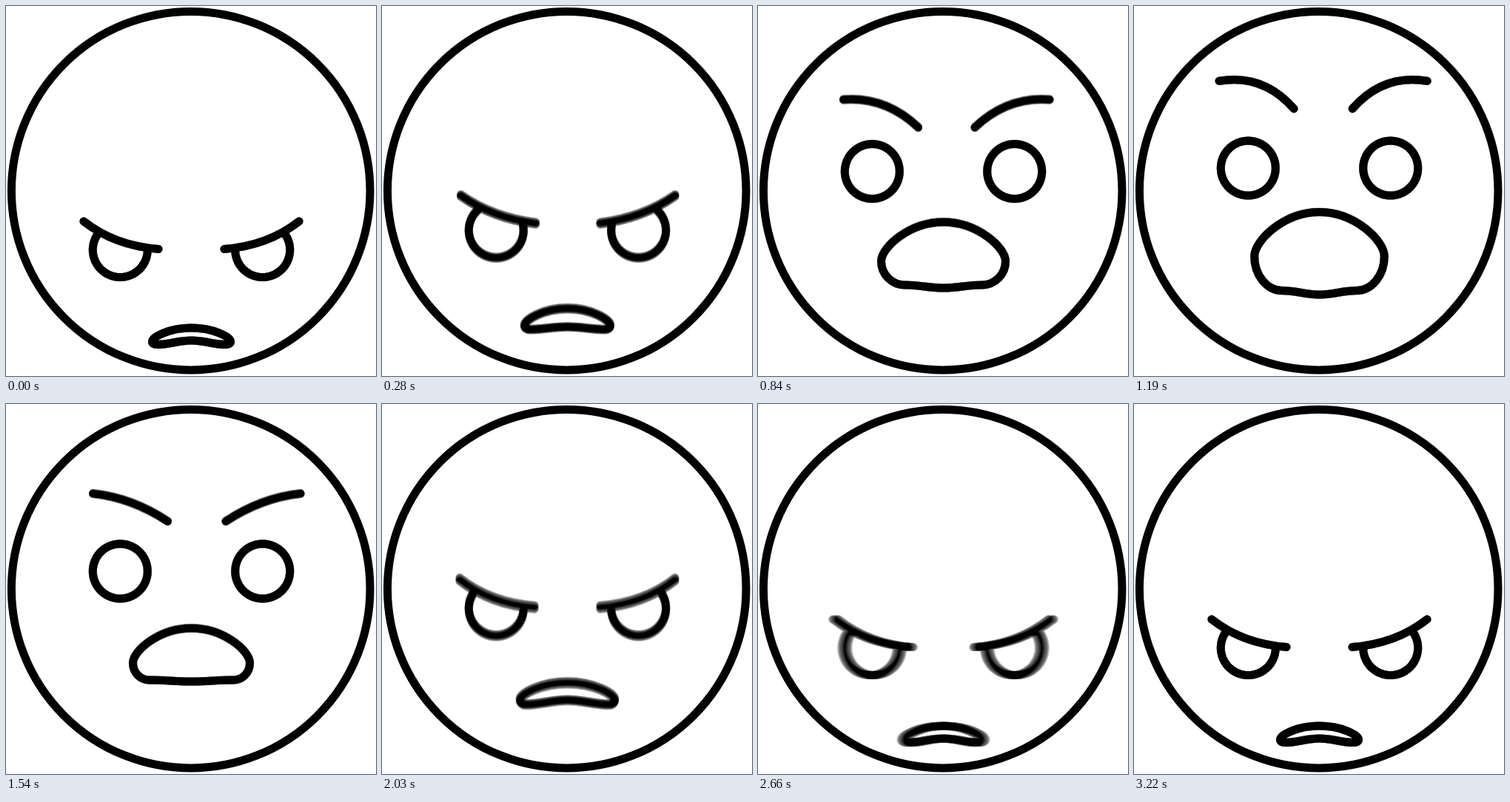
Animation, 500 px wide and 500 px high, one loop 3.29 s. Source, as an HTML page with a canvas:

```html
<!DOCTYPE html>
<html lang="en">
<head>
<meta charset="utf-8">
<title>Grumpy face</title>
<style>
  html, body { margin: 0; width: 100%; height: 100%; overflow: hidden; background: #fff; }
  svg, canvas { position: absolute; left: 0; top: 0; width: 500px; height: 500px; }
  canvas { filter: url(#firm); }
</style>
</head>
<body>
<svg viewBox="0 0 500 500">
  <filter id="firm" color-interpolation-filters="sRGB">
    <feComponentTransfer><feFuncA type="table" tableValues="0 .3 .55 .65 .75 .87 1"/></feComponentTransfer>
  </filter>
  <circle cx="249.7" cy="249.7" r="242.3" fill="none" stroke="#000" stroke-width="11"/>
</svg>
<canvas width="500" height="500"></canvas>
<script>
const LOOP = 3290, STEP = 70, SHUTTER = 22, SAMPLES = 8;
const MIRROR = 501, MID = 250.5;

// brow y, brow sag, left dx, right dx (mirrored), eye y,
// mouth: top, bottom, half width, side y, corner offset, corner y
const REST = [291, 14, 0, 0, 329.5, 435, 452, 53, 453.5, 47, 457.5];
const POSES = [
  [0, REST],
  [420, [226, 8, 3, 0, 281, 383, 417, 63, 411, 54, 419]],
  [560, [172, -3, 6, 1, 243.5, 325, 385.5, 75, 364, 58, 384.5]],
  [630, [152, -9, 8, 1.5, 234, 311, 384, 79, 355, 57, 382]],
  [840, [126.5, -23, 10.5, 2, 223.5, 292, 381, 84, 345, 52, 377]],
  [1150, [101, -29, 10, 0, 219, 278, 390.5, 88, 338, 50, 385]],
  [1540, [121, -13, 12.5, -2, 226, 303, 375, 79, 350, 57, 373]],
  [1680, [138, -6, 12, -5, 232, 312, 377, 77, 354, 58, 376]],
  [2030, [237, 14, 0, 0, 276, 376.5, 400, 64, 400, 57, 406]],
  [2180, REST]
];

// Slope at a pose: flat at the ends and at turning points.
function slope(i, k) {
  if (i === 0 || i === POSES.length - 1) return 0;
  const [[ta, a], [, b], [tc, c]] = POSES.slice(i - 1, i + 2);
  return (b[k] - a[k]) * (c[k] - b[k]) <= 0 ? 0 : (c[k] - a[k]) / (tc - ta);
}

function poseAt(t) {
  if (t <= 0 || t >= 2180) return REST;
  const i = POSES.findIndex(p => p[0] > t) - 1;
  const [t0, a] = POSES[i], [t1, b] = POSES[i + 1];
  const d = t1 - t0, u = (t - t0) / d, v = 1 - u;
  return a.map((from, k) =>
    from * (1 + 2 * u) * v * v + b[k] * (3 - 2 * u) * u * u +
    d * u * v * (slope(i, k) * v - slope(i + 1, k) * u));
}

function shakeAt(t) {
  const half = 88.2, n = (t - 2219) / half;
  if (n < 0 || n > 8) return 0;
  return (n > 7 ? 4.5 : 14) * Math.sin(n * Math.PI);
}

// Vertical opening of the eyes.
function lidAt(t) {
  if (t < 470 || t > 580) return 1;
  return t < 537 ? 1 - .85 * (t - 470) / 67 : .15 + .85 * (t - 537) / 43;
}

function addSide(path, flip, shift, browY, sag, dx, eyeY, lid) {
  const X = x => (flip ? MIRROR - x : x) + shift;
  const x0 = 105 + dx, x2 = 206 + dx, y2 = browY + 37.5;
  const xc = (x0 + x2) / 2 - 3 - .42 * sag, yc = (browY + y2) / 2 + sag;
  const curve = (a, b, c, u) => a * (1 - u) ** 2 + 2 * b * u * (1 - u) + c * u * u;
  path.moveTo(X(x0), browY);
  path.quadraticCurveTo(X(xc), yc, X(x2), y2);

  const browAt = x => {
    let lo = 0, hi = 1;
    for (let i = 0; i < 12; i++) {
      const m = (lo + hi) / 2;
      if (curve(x0, xc, x2, m) < x) lo = m; else hi = m;
    }
    return curve(browY, yc, y2, lo);
  };

  // Only the part of the eye under the brow is drawn.
  let drawing = false;
  for (let i = 0; i <= 96; i++) {
    const a = (i / 48 - .5) * Math.PI;
    const x = 154.3 + 37 * Math.cos(a), y = eyeY + 37 * lid * Math.sin(a);
    const seen = y >= browAt(x);
    if (seen) path[drawing ? 'lineTo' : 'moveTo'](X(x), y);
    drawing = seen;
  }
}

function addMouth(path, shift, top, bottom, w, side, d, by) {
  for (const s of [-1, 1]) {
    const X = x => MID + shift + s * x;
    path.moveTo(X(0), top);
    path.bezierCurveTo(X(.55 * w), top, X(w), side - .35 * (side - top), X(w), side);
    path.bezierCurveTo(X(w), side + .55 * (by - side), X(d + .55 * (w - d)), by, X(d), by);
    path.bezierCurveTo(X(.6 * d), by, X(.4 * d), bottom, X(0), bottom);
  }
}

function faceAt(t) {
  const [browY, sag, left, right, eyeY, ...mouth] = poseAt(t);
  const path = new Path2D(), shift = shakeAt(t), lid = lidAt(t);
  addSide(path, false, shift, browY, sag, left, eyeY, lid);
  addSide(path, true, shift, browY, sag, right, eyeY, lid);
  addMouth(path, shift, ...mouth);
  return path;
}

const ctx = document.querySelector('canvas').getContext('2d');
ctx.lineWidth = 11;
ctx.lineCap = ctx.lineJoin = 'round';
ctx.globalAlpha = 1 / SAMPLES;

// Sum several moments of the shutter for motion blur.
function draw(t) {
  ctx.clearRect(0, 0, 500, 500);
  ctx.globalCompositeOperation = 'lighter';
  for (let i = 0; i < SAMPLES; i++) {
    ctx.stroke(faceAt(t + SHUTTER * ((i + .5) / SAMPLES - .5)));
  }
}

const start = performance.now();
let shown = -1;
function tick() {
  const t = (performance.now() - start) % LOOP;
  const held = Math.floor(t / STEP) * STEP;
  if (held !== shown) draw(shown = held);
  requestAnimationFrame(tick);
}
tick();
</script>
</body>
</html>
```
